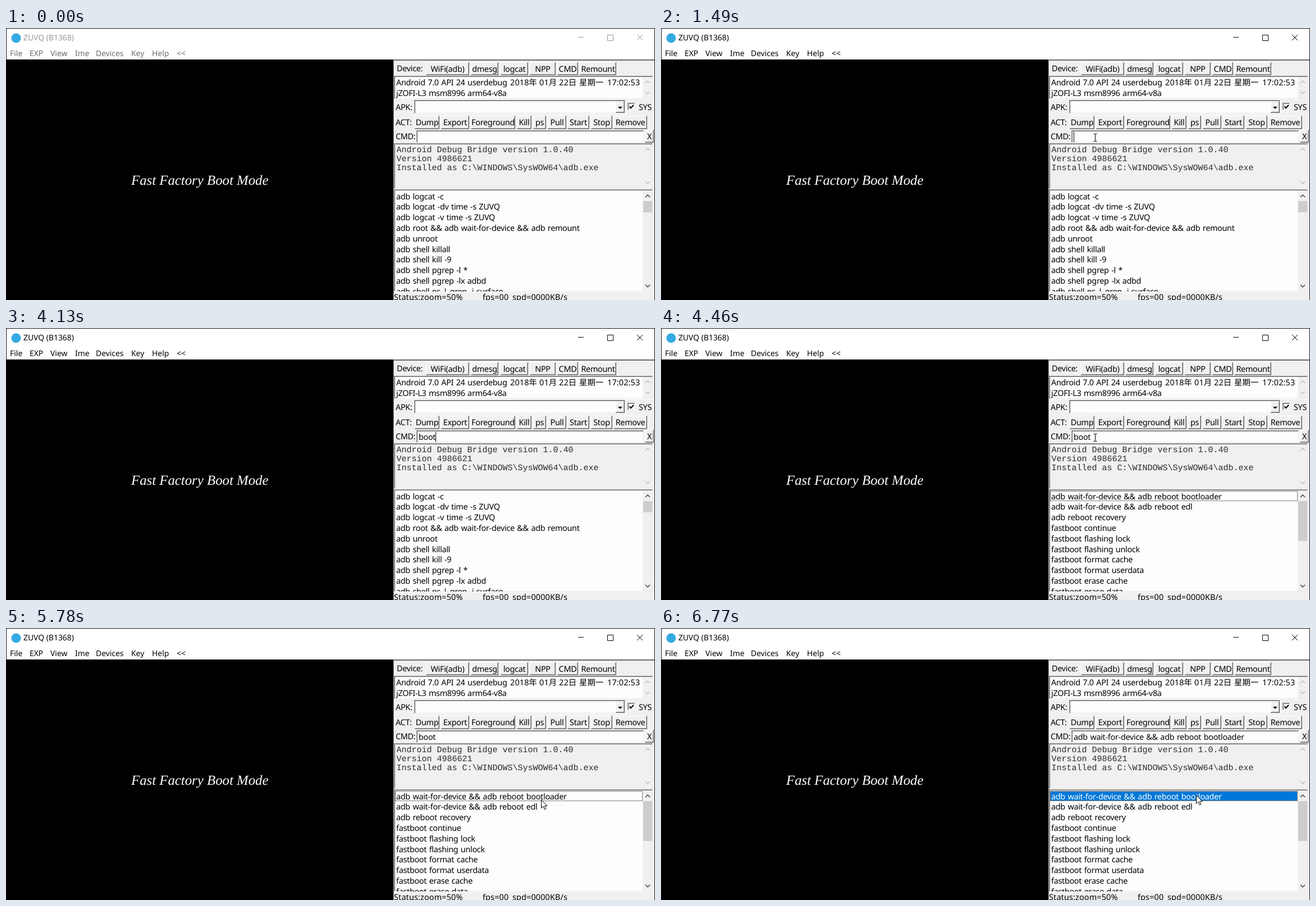
An HTML page that plays this animation: 1156x484 px, repeating every 8 s.

```html
<!DOCTYPE html>
<html lang="en">
<head>
<meta charset="utf-8">
<title>Device console</title>
<style>
  html, body { margin: 0; width: 100%; height: 100%; overflow: hidden; background: #fff; }
  svg { display: block; width: 1156px; height: 484px; }
  text { text-rendering: geometricPrecision; white-space: pre; }
  .ui { font: 14.4px "Noto Sans", "Noto Sans CJK SC", "Noto Sans CJK", sans-serif; letter-spacing: -.3px; word-spacing: 1.1px; }
  .loose { letter-spacing: .15px; }
  .bar { font: 13.9px "Noto Sans", sans-serif; }
  .mono { font: 15px "Liberation Mono", monospace; fill: #2c2c2c; }
  .boot { font: italic 24.8px "Liberation Serif", serif; fill: #fff; }
  .mid { text-anchor: middle; }
  .crisp { shape-rendering: crispEdges; }
</style>
</head>
<body>
<svg id="stage" viewBox="0 0 1156 484"></svg>
<script>
const LOOP = 8000;
const FACE = '#f0f0f0', PAPER = '#fdfdfd', GREY = '#a0a0a0', DARK = '#696969';
const stage = document.getElementById('stage');

function el(tag, attrs, parent = stage) {
  const node = document.createElementNS('http://www.w3.org/2000/svg', tag);
  for (const key in attrs) node.setAttribute(key, attrs[key]);
  return parent.appendChild(node);
}
const box = (x, y, r, b, fill, parent) =>
  el('rect', { x, y, width: r - x, height: b - y, fill, class: 'crisp' }, parent);
const line = (d, stroke, parent, width = 1) =>
  el('path', { d, stroke, fill: 'none', 'stroke-width': width }, parent);
function text(str, x, y, cls = 'ui', parent = stage) {
  const node = el('text', { x, y, class: cls }, parent);
  node.textContent = str;
  return node;
}

// Two-pixel bevel: outer and inner top-left, then inner and outer bottom-right
function bevel(x, y, r, b, fill, [tl, tl2, br2, br]) {
  box(x, y, r, b, br);
  box(x, y, r - 1, b - 1, tl);
  box(x + 1, y + 1, r - 1, b - 1, br2);
  box(x + 1, y + 1, r - 2, b - 2, tl2);
  box(x + 2, y + 2, r - 2, b - 2, fill);
}
const sunken = (x, y, r, b, fill = PAPER) => bevel(x, y, r, b, fill, [GREY, DARK, '#e3e3e3', '#fff']);
function button(label, x, y, r, b) {
  bevel(x, y, r, b, FACE, ['#fff', FACE, GREY, DARK]);
  text(label, (x + r) / 2, y + 17, 'ui mid');
}
function scrollbar(top, bottom, up, down, color) {
  box(1134, top, 1151, bottom, FACE);
  line(`M1139 ${up + 2}l4 -4l4 4M1139 ${down - 2}l4 4l4 -4`, color, stage, 1.5);
}

// Window chrome
box(0, 0, 1156, 484, '#111');
box(1, 1, 1155, 56, '#fff');
el('circle', { cx: 18, cy: 18, r: 8.5, fill: '#35a9e1' });
const title = text('ZUVQ (B1368)', 31, 22, 'bar');
const controls = line('M1019 16.5h10M1071.5 12.5h10v10h-10zM1124 12l10 10M1134 12l-10 10', '#000');
const menu = el('g', {});
[['File', 7], ['EXP', 42], ['View', 79], ['Ime', 123], ['Devices', 160], ['Key', 223], ['Help', 260], ['<<', 304]]
  .forEach(([label, x]) => text(label, x, 50, 'bar', menu));

// Device screen
box(1, 56, 690, 484, '#000');
text('Fast Factory Boot Mode', 223, 279, 'boot');

// Side panel
box(690, 56, 1155, 484, FACE);
box(690, 56, 1155, 58, DARK);
box(690, 56, 691, 484, GREY);

text('Device:', 696, 77);
[['WiFi(adb)', 748, 825], ['dmesg', 828, 877], ['logcat', 881, 930], ['NPP', 933, 979], ['CMD', 982, 1019], ['Remount', 1022, 1087]]
  .forEach(([label, x, r]) => button(label, x, 61, r, 84));

sunken(691, 85, 1153, 127);
text('Android 7.0 API 24 userdebug', 695, 102);
[['2018年', 898], ['01月', 950], ['22日', 985], ['星期一', 1021], ['17:02:53', 1071]]
  .forEach(([part, x]) => text(part, x, 102, 'ui loose'));
text('jZOFI-L3 msm8996 arm64-v8a', 695, 121);
scrollbar(87, 125, 96, 115, '#bdbdbd');

text('APK:', 694, 146);
sunken(727, 128, 1104, 153);
bevel(1086, 130, 1102, 151, FACE, ['#fff', FACE, GREY, DARK]);
el('path', { d: 'M1090 140h8l-4 4z', fill: '#000' });
sunken(1107, 133, 1121, 147);
line('M1110.5 139.5l2.5 3l5 -5.5', '#000', stage, 2);
text('SYS', 1127, 146);

text('ACT:', 694, 173);
[['Dump', 728, 772], ['Export', 775, 825], ['Foreground', 828, 907], ['Kill', 910, 936], ['ps', 939, 962],
 ['Pull', 965, 998], ['Start', 1000, 1039], ['Stop', 1042, 1080], ['Remove', 1082, 1142]]
  .forEach(([label, x, r]) => button(label, x, 156, r, 180));

text('CMD:', 694, 198);
sunken(731, 182, 1137, 205);
button('X', 1138, 181, 1154, 204);
const command = text('', 735, 199);
const caret = box(735, 185, 736, 203, '#000');

sunken(691, 205, 1153, 287, FACE);
['Android Debug Bridge version 1.0.40', 'Version 4986621', 'Installed as C:\\WINDOWS\\SysWOW64\\adb.exe']
  .forEach((row, i) => text(row, 695.5, 221 + 16 * i, 'mono'));
scrollbar(207, 285, 216, 275, '#bdbdbd');

// Command list
sunken(691, 287, 1153, 470);
scrollbar(289, 468, 299, 459, '#404040');
const thumb = box(1135, 308, 1151, 328, '#cdcdcd');
const clip = el('clipPath', { id: 'rows' });
box(693, 289, 1134, 469, '#000', clip);

function list(rows) {
  const group = el('g', { 'clip-path': 'url(#rows)' });
  rows.forEach((row, i) => text(row, 695, 304.5 + 18.83 * i, 'ui', group));
  return group;
}
const selection = box(693, 290, 1134, 308, '#0078d7');
const focus = line('M693.5 290.5h440v17h-440z', '#000');
focus.setAttribute('stroke-dasharray', '1 1');

const fullList = list([
  'adb logcat -c', 'adb logcat -dv time -s ZUVQ', 'adb logcat -v time -s ZUVQ',
  'adb root && adb wait-for-device && adb remount', 'adb unroot', 'adb shell killall',
  'adb shell kill -9', 'adb shell pgrep -l *', 'adb shell pgrep -lx adbd', 'adb shell ps | grep -i surface'
]);
const picked = 'adb wait-for-device && adb reboot bootloader';
const bootList = list([
  picked, 'adb wait-for-device && adb reboot edl', 'adb reboot recovery',
  'fastboot continue', 'fastboot flashing lock', 'fastboot flashing unlock',
  'fastboot format cache', 'fastboot format userdata', 'fastboot erase cache', 'fastboot erase data'
]);

[['Status:zoom=50%', 691], ['fps=00', 849], ['spd=0000KB/s', 902]]
  .forEach(([part, x]) => text(part, x, 484, 'ui loose'));

// Pointers
const arrow = el('path', {
  d: 'M.5 .5V15.5L4 12.3L6.5 17.8L8.8 16.8L6.4 11.4H11Z', fill: '#fff', stroke: '#000', 'stroke-width': 1
});
const beam = line('M-3 -6.5h2.5M.5 -6.5h2.5M-3 6.5h2.5M.5 6.5h2.5M0 -6.5v13', '#000');

// Each step changes only the values it names
const steps = [
  [0, { active: false, pointer: null, cmd: '', caret: false, filtered: false, selected: false }],
  [500, { pointer: [arrow, 619, 457] }],
  [830, { pointer: [arrow, 761, 236] }],
  [1160, { pointer: [beam, 773.5, 198] }],
  [1490, { active: true, pointer: [beam, 773.5, 195], caret: true }],
  [2150, { caret: false }],
  [2480, { caret: true }],
  [3140, { caret: false }],
  [3470, { pointer: null, cmd: 'b', caret: true }],
  [3800, { cmd: 'boo' }],
  [4130, { cmd: 'boot' }],
  [4460, { pointer: [beam, 773.5, 195], caret: false, filtered: true }],
  [5450, { pointer: [arrow, 894, 296] }],
  [5780, { pointer: [arrow, 953, 305] }],
  [6110, { selected: true }],
  [6440, { pointer: [arrow, 953, 297], cmd: picked }]
];

const show = (node, on) => node.setAttribute('visibility', on ? 'visible' : 'hidden');

function render(s) {
  title.setAttribute('fill', s.active ? '#000' : '#999');
  controls.setAttribute('stroke', s.active ? '#000' : '#999');
  menu.setAttribute('fill', s.active ? '#000' : '#6d6d6d');

  command.textContent = s.cmd;
  caret.setAttribute('x', 735 + Math.round(s.cmd ? command.getComputedTextLength() : 0));
  show(caret, s.caret);

  show(fullList, !s.filtered);
  show(bootList, s.filtered);
  show(focus, s.filtered);
  show(selection, s.selected);
  focus.setAttribute('stroke', s.selected ? '#ff8728' : '#000');
  bootList.firstChild.setAttribute('fill', s.selected ? '#fff' : '#000');
  thumb.setAttribute('height', s.filtered ? 71 : 20);

  for (const shape of [arrow, beam]) show(shape, s.pointer && s.pointer[0] === shape);
  if (s.pointer) {
    const [shape, x, y] = s.pointer;
    shape.setAttribute('transform', `translate(${x} ${y})`);
  }
}

let shown = -1;
const start = performance.now();
function tick() {
  const t = (performance.now() - start) % LOOP;
  const past = steps.filter(([at]) => at <= t);
  if (past.length !== shown) {
    shown = past.length;
    render(Object.assign({}, ...past.map(step => step[1])));
  }
  requestAnimationFrame(tick);
}
tick();
</script>
</body>
</html>
```
